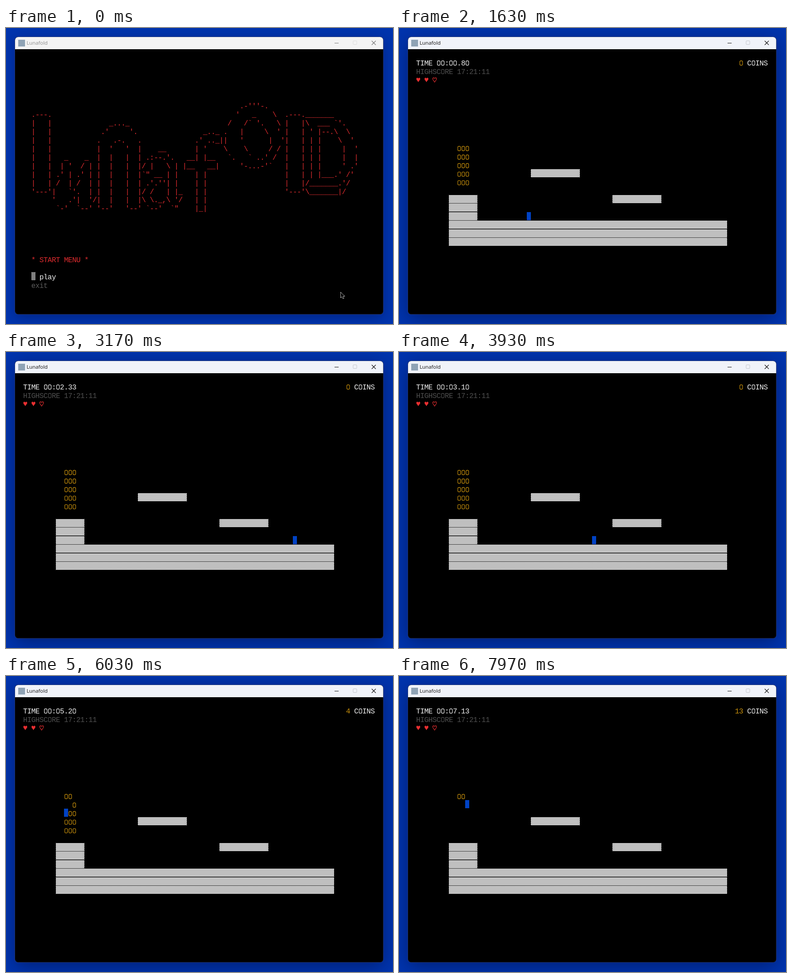
An HTML page with a canvas that plays this animation: 854 by 656 pixels, repeating every 8 s.

```html
<!DOCTYPE html>
<html lang="en">
<head>
<meta charset="utf-8">
<title>Lunafold</title>
<style>
html, body { margin: 0; width: 100%; height: 100%; overflow: hidden; background: #0034ae; }
canvas { display: block; }
</style>
</head>
<body>
<canvas id="stage" width="854" height="656"></canvas>

<!-- Banner letters in reading order: each header gives the letter and its top row -->
<script type="text/plain" id="letters">
:l 7
.---.
|   |
|   |
|   |
|   |
|   |
|   |
|   |
|   |
'---'
:u 12
   _    _
  | '  / |
 .' | .' |
 /  | /  |
|   `'.  |
'   .'|  '/
 `-'  `--'
:n 8
   _..._
 .'     '.
.   .-.   .
|  '   '  |
|  |   |  |
|  |   |  |
|  |   |  |
|  |   |  |
|  |   |  |
|  |   |  |
'--'   '--'
:a 11
    __
 .:--.'.
/ |   \ |
`" __ | |
 .'.''| |
/ /   | |_
\ \._,\ '/
 `--'  `"
:f 9
     _.._
   .' .._|
   | '
 __| |__
|__   __|
   | |
   | |
   | |
   | |
   |_|
:o 6
    .-'''-.
   '   _    \
 /   /` '.   \
.   |     \  '
|   '      |  '
\    \     / /
 `.   ` ..' /
    '-...-'`
:d 7
_______
\  ___ `'.
 ' |--.\  \
 | |    \  '
 | |     |  '
 | |     |  |
 | |     ' .'
 | |___.' /'
/_______.'/
\_______|/
</script>

<script>
const ctx = document.getElementById('stage').getContext('2d');
const LOOP = 8000, FPS = 30, GAME_START = 25, GAME_END = LOOP * FPS / 1000;
const X0 = 20, Y0 = 48.5, CW = 9.02, RH = 18.95;
const RED = '#dc2b2e', WHITE = '#f0f0f0', GREY = '#4e4e4e', GOLD = '#c8900c', BLUE = '#0042c4';

const BLOCKS = [
  { c: 30, r: 14, w: 12, h: 1 },
  { c: 50, r: 17, w: 12, h: 1 },
  { c: 10, r: 17, w: 7, h: 3 },
  { c: 10, r: 20, w: 68, h: 3 }
];

// The player's input in ticks
const RUNS = [
  { from: 40, to: 88, dir: 1 },
  { from: 96, to: 120, dir: -1 },
  { from: 121, to: 133, dir: 1 },
  { from: 137, to: 180, dir: -1 },
  { from: 196, to: 196, dir: 1 },
  { from: 226, to: 226, dir: 1 }
];
const JUMPS = [62, 120, 142, 162, 205, 230];
const RISE = 8, FALL = 14;

const solid = (c, r) => BLOCKS.some(b => c >= b.c && c < b.c + b.w && r >= b.r && r < b.r + b.h);

// Plays the input once: one column per tick, one row per two ticks in the air
function simulate() {
  const path = [];
  let c = 19, r = 19, air = 0;
  for (let k = GAME_START; k < GAME_END; k++) {
    const run = RUNS.find(o => k >= o.from && k <= o.to);
    if (run && !solid(c + run.dir, r)) c += run.dir;

    if (air) air++;
    else if (JUMPS.includes(k)) air = 1;
    else if (!solid(c, r + 1)) air = FALL;

    if (air && air % 2 === 0) {
      if (air <= RISE) r--;
      else if (air >= FALL) r++;
    }
    if (air >= FALL && solid(c, r + 1)) air = 0;
    path[k] = { c, r };
  }
  return path;
}
const path = simulate();

// Each coin knows the tick at which the player reaches it
const coins = [];
for (let r = 11; r <= 15; r++) {
  for (let c = 12; c <= 14; c++) {
    const hit = path.findIndex(p => p && p.c === c && p.r === r);
    coins.push({ c, r, taken: hit < 0 ? Infinity : hit });
  }
}

// Set the banner letters side by side
const banner = [];
let nextCol = 4;
for (const part of document.getElementById('letters').textContent.trim().slice(1).split('\n:')) {
  const [head, ...lines] = part.split('\n');
  banner.push({ name: head[0], row: +head.slice(2), col: nextCol, lines });
  nextCol += Math.max(...lines.map(s => s.length));
  if (head[0] === 'o') {
    const l = banner[0];
    banner.push({ ...l, col: nextCol });
    nextCol += l.lines[0].length;
  }
}

function makeDither(isDark) {
  const tile = document.createElement('canvas');
  tile.width = tile.height = 4;
  const g = tile.getContext('2d');
  for (let y = 0; y < 4; y++) {
    for (let x = 0; x < 4; x++) {
      g.fillStyle = isDark(x, y) ? '#000' : '#fff';
      g.fillRect(x, y, 1, 1);
    }
  }
  return ctx.createPattern(tile, 'repeat');
}
const wallFill = makeDither((x, y) => y % 2 === 0 && (x + y / 2) % 2 === 0);
const markFill = makeDither((x, y) => (x + y) % 2 === 0);

const cellX = c => X0 + c * CW;
const cellY = r => Y0 + r * RH;

function line(color, width, ...points) {
  ctx.strokeStyle = color;
  ctx.lineWidth = width;
  ctx.beginPath();
  points.forEach(p => ctx.lineTo(...p));
  ctx.stroke();
}

function box(x, y, w, h, radius) {
  ctx.beginPath();
  ctx.roundRect(x, y, w, h, radius);
}

// Terminal text, one character per cell; O and 0 share a narrow ring
function put(text, c, r, color) {
  ctx.font = '16px "Liberation Mono", monospace';
  ctx.textAlign = 'center';
  ctx.fillStyle = ctx.strokeStyle = color;
  ctx.lineWidth = 1.15;
  [...text].forEach((ch, i) => {
    const x = cellX(c + i), y = cellY(r);
    if (ch === 'O' || ch === '0') {
      box(x + 1.5, y + 5.2, 6, 10, 2.7);
      ctx.stroke();
    } else if (ch !== ' ') {
      ctx.fillText(ch, x + CW / 2, y + 15.8);
    }
  });
}

function block(c, r, w, fill) {
  const x = Math.round(cellX(c)), end = Math.round(cellX(c + w));
  ctx.fillStyle = fill;
  ctx.fillRect(x, Math.floor(cellY(r)), end - x, 18);
}

function heart(c, r, filled) {
  const x = cellX(c) + CW / 2, y = cellY(r) + 5;
  ctx.beginPath();
  ctx.moveTo(x, y + 1.8);
  for (const s of [-1, 1]) {
    const side = [[1, -0.8, 4.4, -0.6, 4.2, 2.6], [4, 5.5, 1, 6.5, 0, 10]];
    ctx.moveTo(x, y + 1.8);
    for (const [a, b, d, e, f, g] of side) {
      ctx.bezierCurveTo(x + s * a, y + b, x + s * d, y + e, x + s * f, y + g);
    }
  }
  ctx.fillStyle = ctx.strokeStyle = '#ea2f31';
  ctx.lineWidth = 1.1;
  if (filled) ctx.fill(); else ctx.stroke();
}

function drawWindow(active) {
  ctx.fillStyle = '#0034ae';
  ctx.fillRect(0, 0, 854, 656);
  ctx.save();
  ctx.shadowColor = `rgba(0,0,30,${active ? 0.4 : 0.3})`;
  ctx.shadowBlur = active ? 40 : 28;
  ctx.shadowOffsetY = active ? 8 : 6;
  ctx.fillStyle = '#000';
  box(20, 20, 812.5, 614.5, 7);
  ctx.fill();
  ctx.restore();

  ctx.fillStyle = active ? '#f0f3f9' : '#f3f3f3';
  box(20, 20, 812.5, 27, [7, 7, 0, 0]);
  ctx.fill();
  ctx.strokeStyle = 'rgba(60,65,90,.5)';
  ctx.lineWidth = 1;
  box(19.5, 19.5, 813, 615, 7);
  ctx.stroke();

  ctx.fillStyle = '#8fa3b5';
  ctx.fillRect(27, 26, 15, 15);
  ctx.font = '11.3px "Open Sans", sans-serif';
  ctx.textAlign = 'left';
  ctx.fillStyle = active ? '#111' : '#8c8c8c';
  ctx.fillText('Lunafold', 45.5, 37);

  const ink = active ? '#111' : '#777';
  line(ink, 1, [725, 33.5], [734, 33.5]);
  ctx.strokeStyle = active ? '#c3c6cc' : '#dcdcdc';
  box(766, 28.5, 8, 8, 1);
  ctx.stroke();
  line(ink, 1.1, [807, 28.5], [816, 37.5]);
  line(ink, 1.1, [816, 28.5], [807, 37.5]);
}

function drawCursor(x, y) {
  ctx.save();
  ctx.translate(x, y);
  ctx.beginPath();
  for (const p of [[0, 0], [0, 12.5], [3, 10], [5, 14.5], [7.3, 13.5], [5.5, 9], [9.3, 9]]) ctx.lineTo(...p);
  ctx.closePath();
  ctx.fillStyle = '#000';
  ctx.fill();
  ctx.setLineDash([1.5, 0.7]);
  ctx.strokeStyle = '#fff';
  ctx.lineWidth = 1;
  ctx.stroke();
  ctx.restore();
}

function drawMenu(t) {
  for (const { row, col, lines } of banner) lines.forEach((s, i) => put(s, col, row + i, RED));
  put('* START MENU *', 4, 24, RED);
  block(4, 26, 1, markFill);
  put('play', 6, 26, WHITE);
  put('exit', 4, 27, '#5a5a5a');
  if (t < 330) {
    const p = Math.max(0, (t - 30) / 300);
    drawCursor(738.5 + 8 * p, 585.5 + 50 * p * p);
  }
}

function drawGame(tick) {
  const hundredths = Math.round((tick - GAME_START) * 100 / FPS);
  const two = n => String(n).padStart(2, '0');
  put(`TIME 00:${two(Math.floor(hundredths / 100))}.${two(hundredths % 100)}`, 2, 1, WHITE);
  put('HIGHSCORE 17:21:11', 2, 2, GREY);
  for (let i = 0; i < 3; i++) heart(2 + 2 * i, 3, i < 2);

  const count = String(coins.filter(o => o.taken <= tick).length);
  put(count, 82 - count.length, 1, GOLD);
  put('COINS', 83, 1, WHITE);

  for (const { c, r, w, h } of BLOCKS) {
    for (let i = 0; i < h; i++) block(c, r + i, w, wallFill);
  }
  for (const o of coins) if (o.taken > tick) put('O', o.c, o.r, GOLD);
  block(path[tick].c, path[tick].r, 1, BLUE);
}

function frame(now) {
  const t = now % LOOP;
  const tick = Math.min(Math.floor((t + 4) * FPS / 1000), GAME_END - 1);
  drawWindow(t >= 30);
  if (tick < GAME_START) drawMenu(t); else drawGame(tick);
  requestAnimationFrame(() => frame(performance.now()));
}
frame(0);
</script>
</body>
</html>
```
